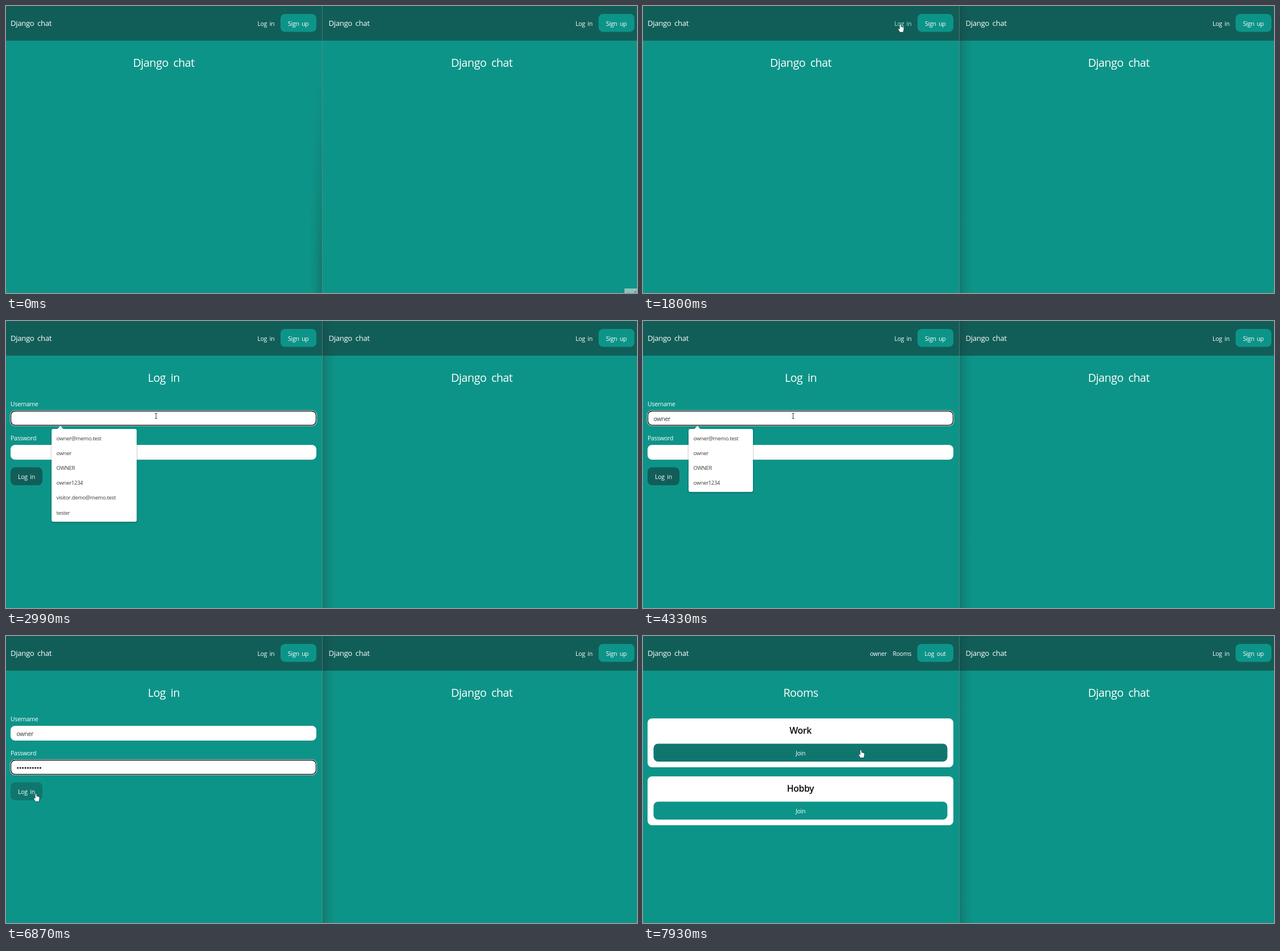
Write an HTML page with a canvas that moves like this. It is 1108 px wide and 505 px high and loops after 8 s.

```html
<!DOCTYPE html>
<html lang="en">
<head>
<meta charset="utf-8">
<title>Django chat</title>
<style>
html, body { margin: 0; height: 100%; overflow: hidden; background: #0d9488; }
canvas { display: block; }
</style>
</head>
<body>
<canvas id="stage" width="1108" height="505"></canvas>
<script>
const c = document.getElementById('stage').getContext('2d');
const LOOP = 8000, SHIFT = 558.5;
const BG = '#0d9488', MID = '#0f766e', DARK = '#115e59';
const USER = 'owner';

const FOCUS = 1650, LOGIN = 1860, NAME = 2460, PASS = 4530, BLUR = 7200, ROOMS = 7400;
const nameKeys = [3390, 3460, 3600, 3660, 3800];
const passKeys = [4990, 5060, 5270, 5340, 5410, 5480, 5570, 5660, 5800, 6000];
const hints = [USER + '@memo.test', USER, USER.toUpperCase(), USER + '1234'];
const moreHints = ['visitor.demo@memo.test', 'tester'];

// pointer way points: time, x, y
const path = [
  [70, 1100, 490], [440, 484, 215], [650, 484, 215], [850, 328, 130], [1100, 505, 30],
  [1230, 492, 36], [1380, 447, 42.5], [1450, 446, 40], [1510, 452, 32], [1790, 452, 32],
  [2320, 261.5, 169], [2460, 261.5, 169], [2600, 263.5, 167], [6530, 263.5, 167],
  [6740, 45, 308], [6870, 52.5, 277.5], [7180, 52.5, 277.5], [7330, 75, 290],
  [7400, 75, 290], [7930, 382.5, 200.5]
];

const arrow = new Path2D('M0 0V9.6L2.2 7.6L3.7 11L5.3 10.3L3.9 7H6.8Z');
const hand = new Path2D('M-1 1Q0-.6 1 1V5Q2 4 3 5.2Q4 4.4 4.8 5.7Q5.9 5.2 6 6.8V9.5L4.8 13.5H-.6L-3.6 8.9Q-3.6 7.2-1 8.6Z');
const ibeam = new Path2D('M-2-4.5H2M0-4.5V4.5M-2 4.5H2');

const count = (keys, t) => keys.filter(k => t >= k).length;
const clamp = v => Math.max(0, Math.min(1, v));

function pointer(t) {
  if (t < path[0][0]) return null;
  const i = path.findIndex(p => p[0] > t);
  if (i < 0) return path[path.length - 1].slice(1);
  const [a, b] = [path[i - 1], path[i]];
  const k = (t - a[0]) / (b[0] - a[0]), e = k * k * (3 - 2 * k);
  return [a[1] + (b[1] - a[1]) * e, a[2] + (b[2] - a[2]) * e];
}

function box(x, y, w, h, r, color) {
  c.fillStyle = color;
  c.beginPath();
  c.roundRect(x, y, w, h, r);
  c.fill();
}

// small text is a little heavier; tight letters, wide word gaps
function text(s, x, y, size = 10.5, color = '#fff', align = 'left', weight = size < 14 ? 500 : 400) {
  c.font = `${weight} ${size}px "Open Sans", "Noto Sans", sans-serif`;
  c.letterSpacing = -.025 * size + 'px';
  c.wordSpacing = .2 * size + 'px';
  c.textAlign = align;
  c.fillStyle = color;
  c.fillText(s, x, y);
}

const title = s => text(s, 277, 107, 19.7, '#fff', 'center');

function header() {
  box(0, 0, 560, 61, 0, DARK);
  text('Django chat', 8, 35, 13.14);
}

function guestNav(over) {
  header();
  text('Log in', 441.5, 34.5, 10.5, over(441, 26, 31, 14) ? '#99f6e4' : '#fff');
  box(482, 14, 63, 31.5, 8, over(482, 14, 63, 31.5) ? MID : BG);
  text('Sign up', 495, 34.5);
}

function field(y, focused) {
  if (focused) {
    box(7, y - 1, 539, 28, 9, '#fff');
    box(7.8, y - .2, 537.4, 26.4, 8.2, '#111');
    box(9.2, y + 1.2, 534.6, 23.6, 7, '#fff');
  } else box(8, y, 537, 26, 8, '#fff');
}

const caret = (x, y) => box(x, y, 1, 14, 0, '#222');

function dropdown(items, w, alpha) {
  const h = items.length * 26.2 + 6;
  c.save();
  c.globalAlpha = alpha;
  c.shadowColor = 'rgba(0,0,0,.4)';
  c.shadowBlur = 3;
  c.shadowOffsetY = 1;
  box(80, 190, w, h, 3, '#fff');
  c.restore();
  c.save();
  c.globalAlpha = alpha;
  c.beginPath();
  c.moveTo(90, 190.5);
  c.lineTo(95.5, 184.5);
  c.lineTo(101, 190.5);
  c.fillStyle = '#fff';
  c.fill();
  items.forEach((s, i) => text(s, 88.5, 210 + i * 26.1, 9.3, '#3a3a3a'));
  c.restore();
}

function loginPage(t, over) {
  guestNav(over);
  title('Log in');
  const inName = t >= NAME && t < PASS, inPass = t >= PASS && t < BLUR;

  text('Username', 8, 149.5);
  field(158, inName);
  const typed = USER.slice(0, count(nameKeys, t));
  text(typed, 18.5, 175.7, 10.5, '#333');
  if (inName && (t < 2990 || t >= nameKeys[0] && t < 4330))
    caret(18 + Math.floor(c.measureText(typed).width), 164);

  text('Password', 8, 209.5);
  field(218, inPass);
  const dots = count(passKeys, t);
  for (let i = 0; i < dots; i++) box(19.2 + i * 4.4, 230.5, 3.2, 3.2, 1.6, '#222');
  if (inPass && (t < 6530 || t >= 7060)) caret(18 + Math.round(dots * 4.4), 224);

  box(8, 257.5, 56, 31.5, 8, over(8, 257.5, 56, 31.5) ? MID : DARK);
  text('Log in', 21, 277.5);

  if (t >= NAME && t < nameKeys[0])
    dropdown([...hints, ...moreHints], 149.5, clamp((t - NAME) / 200));
  else if (t >= nameKeys[0] && t < 4730)
    dropdown(hints, 113, 1 - clamp((t - PASS) / 200));
}

function roomsPage(over) {
  header();
  text(USER, 398.5, 34.5);
  text('Rooms', 438.5, 34.5);
  box(481.5, 14, 63.5, 31.5, 8, BG);
  text('Log out', 494.5, 34.5);
  title('Rooms');
  ['Work', 'Hobby'].forEach((room, i) => {
    const y = 145 + i * 102;
    box(8, y, 537, 86, 8, '#fff');
    text(room, 276.5, y + 27, 15.8, '#0a0a0a', 'center', 600);
    box(18.5, y + 44.5, 516, 31.5, 8, over(18.5, y + 44.5, 516, 31.5) ? MID : BG);
    text('Join', 276.5, y + 64.5, 10.5, '#fff', 'center');
  });
}

function homePage(over) {
  guestNav(over);
  title('Django chat');
}

// the right window's shadow grows towards the bottom
function windowShadow(leftActive) {
  const dir = leftActive ? 1 : -1, x = leftActive ? 556 : 555;
  const g = c.createLinearGradient(x, 0, x + dir * 24, 0);
  [.27, .14, .05, 0].forEach((a, i) => g.addColorStop(i / 3, `rgba(30,50,50,${a})`));
  c.save();
  c.fillStyle = g;
  for (let y = 0; y < 505; y += 5) {
    c.globalAlpha = leftActive ? 1 : clamp((y - 100) / 350);
    c.fillRect(leftActive ? x : x - 24, y, 24, 5);
  }
  c.restore();
  box(555, 0, 1, 505, 0, 'rgba(130,130,128,.6)');
}

function drawPointer(t, pos, over) {
  const [x, y] = pos;
  const login = t >= LOGIN && t < ROOMS, rooms = t >= ROOMS;
  const onText = login && (over(8, 158, 537, 26) || over(8, 218, 537, 26));
  const onLink = rooms
    ? over(18.5, 189.5, 516, 31.5) || over(18.5, 291.5, 516, 31.5)
    : over(441, 26, 31, 14) || over(482, 14, 63, 31.5) || login && over(8, 257.5, 56, 31.5);
  c.save();
  c.translate(x, y);
  c.lineWidth = 1;
  if (onText) {
    c.strokeStyle = '#444';
    c.stroke(ibeam);
  } else {
    const shape = onLink ? hand : arrow;
    c.strokeStyle = '#222';
    c.fillStyle = '#fff';
    c.stroke(shape);
    c.fill(shape);
  }
  c.restore();
}

function draw(t) {
  const pos = pointer(t);
  const over = (x, y, w, h) =>
    !!pos && pos[0] >= x && pos[0] <= x + w && pos[1] >= y && pos[1] <= y + h;

  box(0, 0, 1108, 505, 0, BG);
  if (t < LOGIN) homePage(over);
  else if (t < ROOMS) loginPage(t, over);
  else roomsPage(over);

  c.save();
  c.beginPath();
  c.rect(556, 0, 552, 505);
  c.clip();
  c.translate(SHIFT, 0);
  box(-10, 0, 570, 505, 0, BG);
  box(-10, 0, 570, 61, 0, DARK);
  homePage(() => false);
  c.restore();

  windowShadow(t >= FOCUS);
  if (t < 140) {
    box(1086, 497, 22, 8, 0, '#8fc3bd');
    text('↘ 작', 1091, 509, 9, '#4b6663');
  }
  if (pos) drawPointer(t, pos, over);
}

const start = performance.now();
function frame() {
  draw((performance.now() - start) % LOOP);
  requestAnimationFrame(frame);
}
frame();
</script>
</body>
</html>
```
